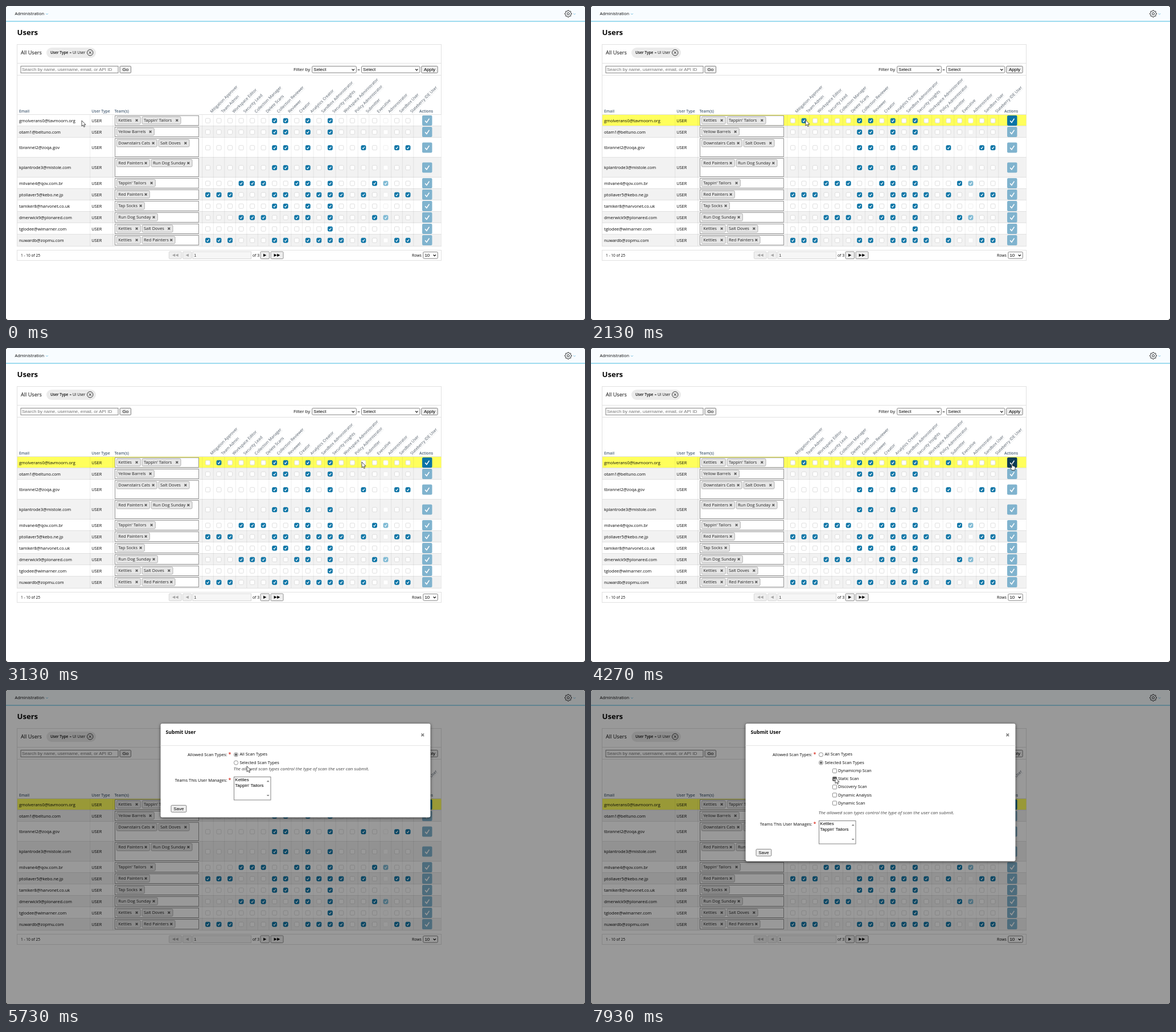
These frames come from a looping animation (1017x551 px, 8 s). An HTML page:

```html
<!DOCTYPE html>
<html lang="en">
<head>
<meta charset="utf-8">
<title>Users</title>
<style>
  html, body { margin: 0; width: 100%; height: 100%; overflow: hidden; background: #000; }
  svg { display: block; width: 1017px; height: 551px; background: #fff; border-radius: 4px; }
  text { font-family: "Open Sans", "Noto Sans", sans-serif; font-size: 7.45px; font-weight: 500; fill: #080808; white-space: pre; }
  .ui { font-family: "Liberation Sans", Arial, sans-serif; font-size: 8px; font-weight: 400; fill: #000; }
  .head { font-size: 6.8px; font-weight: 600; fill: #4a6076; }
  .slant { font-size: 7px; fill: #4c5763; }
  .help { font-size: 8px; font-weight: 400; font-style: italic; fill: #444; }
</style>
</head>
<body>
<svg id="stage" viewBox="0 0 1017 551"></svg>
<script>
const LOOP = 8000, STEP = 1000 / 15;
const COL0 = 354.5, COLW = 19.53;
const BLUE = '#0873a5', PALE = '#80b3ce', NAVY = '#0d3b54', LINE = '#e1e1e1', EDGE = '#767676';
const stage = document.getElementById('stage');

function el(tag, attrs, parent = stage) {
  const node = document.createElementNS('http://www.w3.org/2000/svg', tag);
  for (const key in attrs) node.setAttribute(key, attrs[key]);
  parent.appendChild(node);
  return node;
}
function text(x, y, str, attrs = {}, parent = stage) {
  const node = el('text', { x, y, ...attrs }, parent);
  node.textContent = str;
  return node;
}
const rect = (x, y, width, height, fill, attrs = {}, parent = stage) =>
  el('rect', { x, y, width, height, fill, ...attrs }, parent);
const path = (d, stroke, width, attrs = {}, parent = stage) =>
  el('path', { d, stroke, 'stroke-width': width, fill: 'none', ...attrs }, parent);
const group = (parent = stage) => el('g', {}, parent);
const show = (node, on) => node.setAttribute('display', on ? 'inline' : 'none');
const fill = (node, color) => node.setAttribute('fill', color);

function chevron(x, y, r, color, width, parent) {
  path(`M${x - r},${y - r / 2} l${r},${r} l${r},${-r}`, color, width, {}, parent);
}
function cross(x, y, r, color, width, parent) {
  path(`M${x - r},${y - r} l${2 * r},${2 * r} M${x + r},${y - r} l${-2 * r},${2 * r}`, color, width, {}, parent);
}
function tick(x, y, s, color, width, parent) {
  return path(`M${x - s},${y + s * .1} l${s * .75},${s * .85} l${s * 1.25},${-s * 1.9}`, color, width, {}, parent);
}
function button(x, y, w, h, label, parent) {
  rect(x, y, w, h, '#efefef', { rx: 1.5, stroke: EDGE, 'stroke-width': .9 }, parent);
  text(x + w / 2, y + h / 2 + 2.9, label, { class: 'ui', 'text-anchor': 'middle' }, parent);
}
function select(x, y, w, label) {
  rect(x, y, w, 11.5, '#fff', { rx: 1.5, stroke: EDGE, 'stroke-width': .9 });
  text(x + 2.6, y + 8.6, label, { class: 'ui' });
  chevron(x + w - 5.5, y + 6, 2.2, '#111', 1.2);
}

// Top bar
rect(0, 0, 1017, 26.5, '#f8fcff');
rect(0, 26.3, 1017, 1.2, '#62c5e6');
text(15.4, 16, 'Administration', { style: 'font-size:7.5px' });
chevron(72, 14, 1.9, '#5db4dc', .8);
chevron(998.5, 14, 1.9, '#5db4dc', .8);
let gear = '';
for (let i = 0; i < 32; i++) {
  const a = (i - .5) * Math.PI / 16, r = i % 4 < 2 ? 6 : 4.7;
  gear += `${i ? 'L' : 'M'}${987.5 + r * Math.cos(a)},${13.6 + r * Math.sin(a)}`;
}
path(gear + 'Z', '#222', 1, { 'stroke-linejoin': 'round' });
el('circle', { cx: 987.5, cy: 13.6, r: 2, fill: 'none', stroke: '#222', 'stroke-width': 1 });

// Title, chip and filters
text(19.5, 51, 'Users', { style: 'font-size:13.1px;font-weight:700' });
rect(19.5, 67.5, 745, 354, 'none', { stroke: LINE });
path('M19.5,100.5 H765 M19.5,121.5 H765', LINE, 1);
text(26, 85, 'All Users', { style: 'font-size:9.1px' });
rect(71, 73, 87, 18, '#ebebeb', { rx: 9 });
text(78, 84.3, 'User Type', { style: 'font-size:6.55px;font-weight:600' });
text(111.6, 84.3, '= UI User', { style: 'font-size:6.5px' });
el('circle', { cx: 147.7, cy: 81.8, r: 5.2, fill: 'none', stroke: '#222', 'stroke-width': .9 });
cross(147.7, 81.8, 2.1, '#222', 1);

rect(26, 105.6, 171, 11.8, '#fff', { stroke: EDGE, 'stroke-width': .9 });
text(28, 114.3, 'Search by name, username, email, or API ID', { class: 'ui', style: 'fill:#757575' });
button(200, 105.5, 19.5, 12, 'Go');
text(505, 114.2, 'Filter by', { style: 'font-size:7.9px' });
select(537.7, 105.7, 77.6, 'Select');
text(617.3, 114.2, '=', { style: 'font-size:7.9px' });
select(624.5, 105.7, 102.3, 'Select');
button(729.7, 105.5, 28.5, 12, 'Apply');

// Table head
text(23, 186.5, 'Email', { class: 'head' });
text(150.3, 186.5, 'User Type', { class: 'head' });
text(190.5, 186.5, 'Team(s)', { class: 'head' });
text(738, 186.5, 'Actions', { class: 'head', 'text-anchor': 'middle' });
['Mitigation Approver', 'Team Admin', 'Workspace Editor', 'Security Lead', 'Collection Manager',
 'Delete Scans', 'Collection Reviewer', 'Reviewer', 'Creator', 'Analytics Creator',
 'Sandbox Administrator', 'Security Insights', 'Workspace Administrator', 'Policy Administrator',
 'Submitter', 'Executive', 'Administrator', 'Sandbox User', 'Slateberry IDE User'].forEach((name, i) => {
  const g = el('g', { transform: `translate(${361.5 + i * COLW},188) rotate(-45)` });
  const label = text(0, 0, name, { class: 'slant' }, g);
  path(`M0,2 H${label.getComputedTextLength()}`, '#b9c0c7', .5, { 'stroke-dasharray': '1 1' }, g);
});

// Table body
const teams = {
  k: ['Kettles', 42], t: ["Tappin' Tailors", 68], y: ['Yellow Barrels', 66], d: ['Downstairs Cats', 71],
  s: ['Salt Doves', 54], r: ['Red Painters', 58], u: ['Run Dog Sunday', 72], p: ['Tap Socks', 49]
};
const basic = [6, 7, 9, 11], lead = [3, 4, 5, 8, 9, 11, 15, 16];
const full = [0, 1, 2, 6, 7, 9, 10, 11, 12, 14, 17, 18];
const rows = [
  ['gmolverans0@tavmoorn.org', 'kt', basic, 20],
  ['otam1@beltuno.com', 'y', basic, 20],
  ['tbrannel2@zoqa.gov', 'ds', [...basic, 14, 17, 18], 35],
  ['kplantrode3@mistole.com', 'ru', basic, 35],
  ['milvane4@qov.com.br', 't', lead, 20],
  ['ptollaver5@kebo.ne.jp', 'r', full, 20],
  ['tamiker8@harvonet.co.uk', 'p', basic, 20],
  ['dmerwick9@plonared.com', 'u', lead, 20],
  ['tglodee@wimarner.com', 'ks', [11], 20],
  ['nuwardb@zopmu.com', 'kr', full, 20]
];

function checkbox(x, y, on, faint) {
  const box = rect(x - 4, y - 4, 8, 8, '#fff', { rx: 1.8, 'stroke-width': .8 });
  const mark = tick(x, y, 2, '#fff', 1.2);
  const set = state => {
    const checked = state === 'on';
    fill(box, checked ? (faint ? '#7fbad4' : BLUE) : state === 'press' ? '#d9d9d9' : '#fff');
    box.setAttribute('stroke', checked ? (faint ? '#7fbad4' : BLUE) : faint ? '#ececec' : '#d6d6d6');
    show(mark, checked);
  };
  set(on ? 'on' : 'off');
  return set;
}

let top0 = 191, dirtyRow, saveBox;
const live = {};
rows.forEach(([mail, tags, checks, h], r) => {
  const mid = top0 + h / 2 + .2;
  const back = rect(20, top0, 744.5, h, r % 2 ? '#f2f2f2' : '#fff');
  if (!r) dirtyRow = back;
  path(`M20,${top0 - .5} H765`, LINE, 1);
  text(23, mid + 2.4, mail);
  text(150.3, mid + 2.4, 'USER', { style: 'font-size:7.3px' });
  rect(191.5, top0 + 1.5, 147, h - 3, '#fff', { stroke: '#8b8b8b', 'stroke-width': .9 });
  let x = 194.3;
  const y = top0 + 9.7;
  for (const key of tags) {
    const [name, w] = teams[key];
    rect(x, y - 6.4, w, 12.8, '#e6e6e6', { rx: 1.8, stroke: '#a8a8a8', 'stroke-width': .9 });
    text(x + 3, y + 2.7, name, { style: 'fill:#222' });
    cross(x + w - 6.7, y - .1, 1.9, '#555', 1.4);
    x += w + 2.7;
  }
  for (let c = 0; c < 19; c++) {
    const set = checkbox(COL0 + c * COLW, mid, checks.includes(c), c === 16);
    if (!r) live[c] = set;
  }
  const act = rect(731, mid - 9.2, 17.5, 18, PALE, { rx: 2 });
  if (!r) saveBox = act;
  tick(739.8, mid - .2, 3.6, '#fff', 1.6);
  top0 += h;
});
let grid = 'M147.7,191 V421 M187.7,191 V421';
for (let c = 0; c <= 19; c++) grid += ` M${COL0 + (c - .5) * COLW},191 V421`;
path(grid, '#000', .7, { 'stroke-opacity': .1 });

// Pager
rect(19.5, 428.5, 745, 18, '#fff', { stroke: LINE });
text(26, 439.6, '1 - 10 of 25', { style: 'font-size:6.6px' });
function pager(x, w, dir, count, color) {
  rect(x, 431, w, 12.6, '#efefef', { rx: 1.5, stroke: color === '#000' ? EDGE : '#cfcfcf', 'stroke-width': .8 });
  for (let i = 0; i < count; i++) {
    const cx = x + w / 2 + (i - (count - 1) / 2) * 5.6;
    el('path', { d: `M${cx - 2.6 * dir},434.7 l${5.2 * dir},2.6 l${-5.2 * dir},2.6 Z`, fill: color });
  }
}
pager(286.3, 22, -1, 2, '#a6a6a6');
pager(310.5, 15.5, -1, 1, '#a6a6a6');
rect(328, 431, 102.7, 12.6, '#f6f6f6', { stroke: '#cfcfcf', 'stroke-width': .8 });
text(330, 440.2, '1', { class: 'ui', style: 'fill:#444' });
text(433, 439.7, 'of 3', { style: 'font-size:6.8px' });
pager(447, 15.5, 1, 1, '#000');
pager(465, 22, 1, 2, '#000');
text(713, 439.7, 'Rows', { style: 'font-size:6.8px' });
select(732.8, 431.6, 25.5, '10');

// Dialog
const dialog = group();
rect(0, 0, 1017, 551, '#000', { opacity: .4 }, dialog);
const panel = rect(271.5, 59, 474, 164.5, '#fff',
  { rx: 3, style: 'filter:drop-shadow(0 1px 2.5px rgba(0,0,0,.65))' }, dialog);
text(280.6, 77.3, 'Submit User', { style: 'font-size:8.65px;font-weight:700' }, dialog);
cross(731.8, 78.8, 2.3, '#7d7d7d', 1.7, dialog);
path('M271.5,97.5 H745.5', '#e4e4e4', 1, {}, dialog);

function field(y, label, parent) {
  text(388.5, y, label, { 'text-anchor': 'end' }, parent);
  text(390.6, y + .4, '*', { style: 'font-size:9px;font-weight:600;fill:#d8281c' }, parent);
}
function radio(y, label) {
  const ring = el('circle', { cx: 404, cy: y, r: 3.6, fill: '#fff', stroke: '#767676', 'stroke-width': .8 }, dialog);
  const dot = el('circle', { cx: 404, cy: y, r: 2.2, fill: '#666' }, dialog);
  text(410.4, y + 2, label, {}, dialog);
  return { ring, dot };
}
field(115.6, 'Allowed Scan Types:', dialog);
const every = radio(113.4, 'All Scan Types');
const chosen = radio(127.6, 'Selected Scan Types');

const scans = group(dialog);
let pick, pickMark;
['Dynamicmp Scan', 'Static Scan', 'Discovery Scan', 'Dynamic Analysis', 'Dynamic Scan'].forEach((name, i) => {
  const y = 141.9 + i * 14.15;
  const box = rect(424.4, y - 3.6, 7.2, 7.2, '#fff', { rx: 1.3, stroke: '#6f6f6f', 'stroke-width': .8 }, scans);
  text(434, y + 2.2, name, { style: 'font-size:7.3px' }, scans);
  if (i === 1) {
    pick = box;
    pickMark = tick(428, y, 2, '#fff', 1.1, scans);
  }
});

const lower = group(dialog);
text(399.4, 141.4, 'The allowed scan types control the type of scan the user can submit.', { class: 'help' }, lower);
field(160.8, 'Teams This User Manages:', lower);
rect(400.5, 152.5, 64.5, 40.5, '#fff', { stroke: '#767676', 'stroke-width': .9 }, lower);
text(402.3, 159.7, 'Kettles', { class: 'ui' }, lower);
text(402.3, 169.7, "Tappin' Tailors", { class: 'ui' }, lower);
el('path', { d: 'M457.8,161.2 h4.8 l-2.4,-2.6 Z M457.8,184 h4.8 l-2.4,2.6 Z', fill: '#808080' }, lower);
button(290, 202.3, 26.8, 12, 'Save', lower);

// Pointer
const arrow = path('M0,0 V10 L2.3,7.9 L3.9,11.3 L5.5,10.6 L4,7.3 H7 Z', '#222', .8, { fill: '#fff' });
const hand = path('M-.9,1 Q0,-.6 .9,1 V4 Q2,3.4 2.5,4.4 Q3.6,3.9 4,5 Q5.2,4.7 5.3,6 V8.2 Q5.2,10 4.3,11.4 ' +
  'H-.8 Q-2,9.6 -3.4,7.4 Q-3.4,6 -2.2,6.4 L-.9,7.4 Z', '#111', .8, { fill: '#fff' });

// start, end, from x y, to x y, sideways bow x y
const moves = [
  [467, 1340, 133, 201, 368, 200, 0, 1.5],
  [1400, 1600, 368, 200, 372, 200, 0, 0],
  [1930, 3133, 372, 200, 625, 200, 0, 1],
  [3400, 4267, 625, 200, 738.5, 202, 0, 1],
  [5067, 5933, 738.5, 202, 407, 130, 0, 0],
  [6133, 6200, 407, 130, 407, 131, 0, 0],
  [6733, 7467, 407, 131, 430, 152, 6, 0],
  [7667, 7733, 430, 152, 429, 154, 0, 0]
];
const ease = p => p < .5 ? 4 * p ** 3 : 1 - 4 * (1 - p) ** 3;

function pointer(t) {
  let pos = [133, 201];
  for (const [a, b, x0, y0, x1, y1, bx, by] of moves) {
    if (t < a) break;
    const p = ease(Math.min(1, (t - a) / (b - a))), bow = Math.sin(Math.PI * p);
    pos = [x0 + (x1 - x0) * p + bx * bow, y0 + (y1 - y0) * p + by * bow];
  }
  return pos;
}

function render(time) {
  const t = Math.floor((time % LOOP + 4) / STEP) * STEP + .5;
  const [x, y] = pointer(t);
  const dirty = t >= 2000, open = t >= 4466, wide = t >= 6466;
  const hover = dirty && !open && x >= 731;

  fill(dirtyRow, dirty ? '#ffff5c' : '#fff');
  live[1](dirty ? 'on' : t >= 1866 ? 'press' : 'off');
  live[14](t >= 3466 ? 'on' : t >= 3333 ? 'press' : 'off');
  fill(saveBox, hover || (open && t < 4533) ? NAVY : dirty ? BLUE : PALE);

  show(dialog, open);
  panel.setAttribute('height', wide ? 241.5 : 164.5);
  lower.setAttribute('transform', `translate(0,${wide ? 77 : 0})`);
  show(scans, wide);
  show(every.dot, !wide);
  show(chosen.dot, wide);
  fill(chosen.ring, t >= 6400 && !wide ? '#d4d4d4' : '#fff');
  fill(pick, t >= 7933 ? '#555' : t >= 7800 ? '#cfcfcf' : '#fff');
  show(pickMark, t >= 7933);

  show(arrow, !hover);
  show(hand, hover);
  const place = `translate(${x.toFixed(2)},${y.toFixed(2)})`;
  arrow.setAttribute('transform', place);
  hand.setAttribute('transform', `${place} translate(1.3,1)`);
}

const begin = performance.now();
function play() {
  render(performance.now() - begin);
  requestAnimationFrame(play);
}
play();
</script>
</body>
</html>
```
